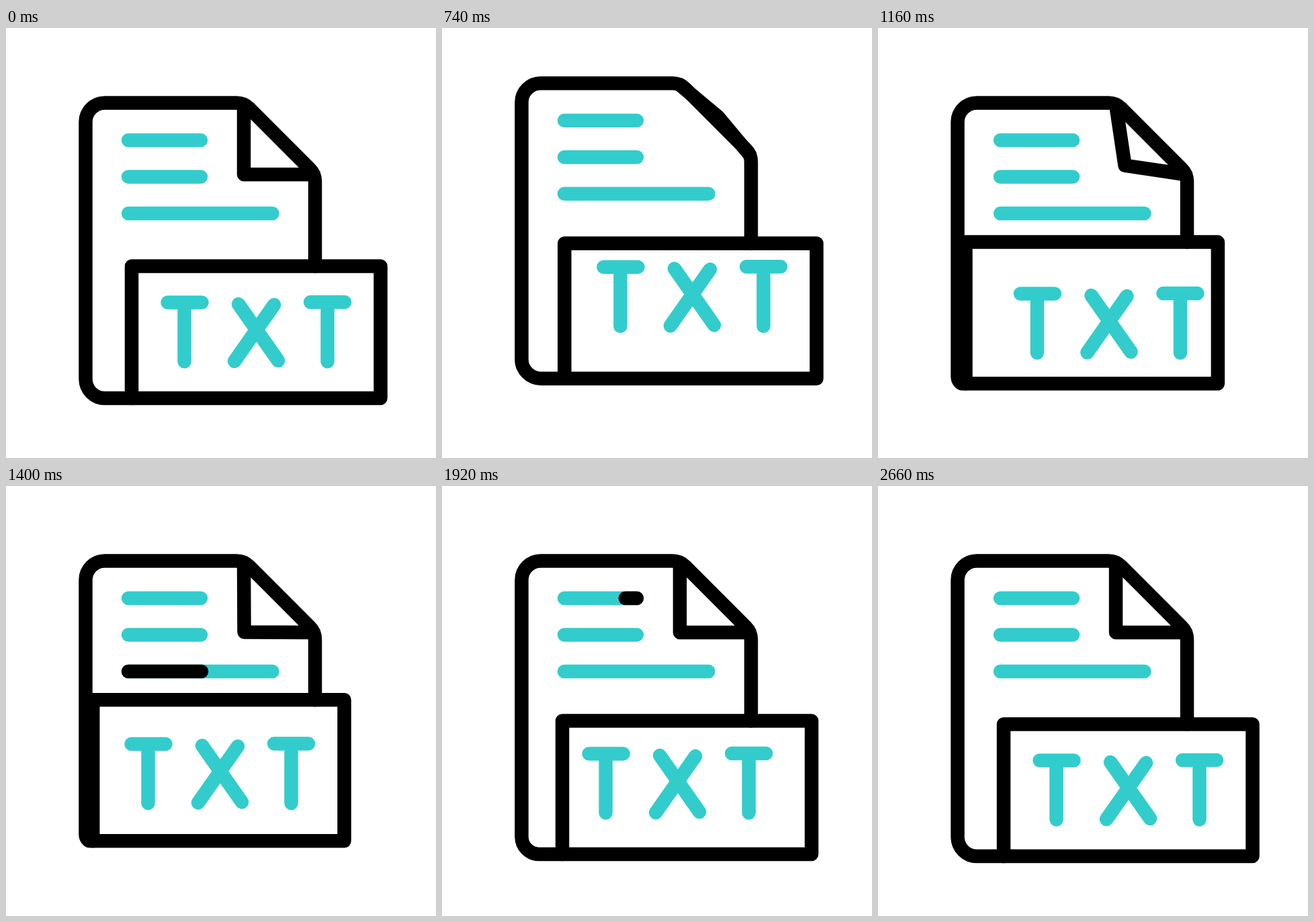
Write an HTML page that moves like this. It is 640 px wide and 640 px high and loops after 3000 ms.

```html
<!DOCTYPE html>
<html lang="en">
<head>
<meta charset="utf-8">
<title>Text file icon</title>
<style>
  html, body { margin: 0; width: 100%; height: 100%; overflow: hidden; background: #fff; }
  svg { display: block; width: 100vw; height: 100vh; }
  path { fill: none; stroke: #000; stroke-width: 20.5; stroke-linecap: round; stroke-linejoin: round; }
  .teal { stroke: #33cccc; }
</style>
</head>
<body>
<svg viewBox="0 0 640 640">
  <g id="page">
    <path class="teal" d="M182 167H290M182 221.5H290M182 276H396.5"/>
    <path class="ink"/>
    <path class="ink"/>
    <path class="ink"/>
    <path id="sheet"/>
    <path id="fold"/>
    <path id="label"/>
  </g>
  <path id="letters" class="teal" d="M240.5 408.5H291.5M265.5 408.5V496.5M346 411L405 495M399 412L340 496M453 408H504M478.5 408V496.5"/>
</svg>
<script>
const LOOP = 3000;
const $ = id => document.getElementById(id);
const page = $('page'), sheet = $('sheet'), fold = $('fold');
const label = $('label'), letters = $('letters');
const inks = [...document.querySelectorAll('.ink')];

// Text rows from bottom to top, in the order they are swept
const rows = [
  { y: 276, len: 214.5 },
  { y: 221.5, len: 108 },
  { y: 167, len: 108 }
];

const ramp = (t, a, b) => Math.min(1, Math.max(0, (t - a) / (b - a)));
const ease = (t, a, b) => {
  const u = ramp(t, a, b);
  return u * u * (3 - 2 * u);
};
// Rises over a..b, rests, falls over c..d
const swing = (t, a, b, c, d) => ease(t, a, b) - ease(t, c, d);
const bump = (t, a, peak, d, power = 1) => swing(t, a, peak, peak, d) ** power;

function drawSheet(slide, top, left) {
  const bottom = 551 + 0.42 * slide;
  const endX = 147 + 0.4 * slide;
  const sideY = 522.5 + 0.084 * slide;
  const c1 = endX - 0.55 * (endX - 118.5);
  const c2 = sideY + 0.55 * (bottom - sideY);
  sheet.setAttribute('d',
    `M${left} ${bottom}H${endX}C${c1} ${bottom} 118.5 ${c2} 118.5 ${sideY}` +
    `V140A28.5 28.5 0 0 1 147 111.5H343C350 111.5 357 114.3 361.8 119.2` +
    `L452.3 209.8C457.2 214.7 460 221.5 460 228.5V${top}`);
  label.setAttribute('d', `M${left} ${top}H${557.5 + slide}V${bottom}H${left}Z`);
}

function drawInk(t) {
  // The sweep runs forward, then backward
  const s = 2000 - Math.abs(t - 2000);
  rows.forEach(({ y, len }, i) => {
    const start = 1340 + 120 * i;
    const head = ramp(s, start, start + 120);
    const tail = ramp(s, start + 240, start + 360);
    const shown = head > 0 && tail < 1;
    inks[i].setAttribute('d', shown ? `M${182 + tail * len} ${y}H${182 + head * len}` : '');
  });
}

function draw(t) {
  const lift = -44 * bump(t, 70, 570, 1070, 1.28);
  const slide = -54 * swing(t, 890, 1200, 1430, 2070);
  const grow = 4.7 * bump(t, 40, 700, 1400);
  const open = 58 * bump(t, 0, 785, 1600, 2.5);

  page.setAttribute('transform', `translate(0 ${lift})`);
  drawSheet(slide, 354.5 + 0.67 * slide - grow, 187 + 1.07 * slide - grow);
  fold.setAttribute('d', `M354 114L${354 + open} ${218 - open}L458 218`);
  drawInk(t);

  const textX = -54 * swing(t, 1000, 1310, 1560, 2200);
  const textY = 0.455 * textX - 57 * bump(t, 100, 666, 1116);
  letters.setAttribute('transform', `translate(${textX} ${textY})`);
}

const begin = performance.now();
function tick() {
  draw((performance.now() - begin) % LOOP);
  requestAnimationFrame(tick);
}
tick();
</script>
</body>
</html>
```
